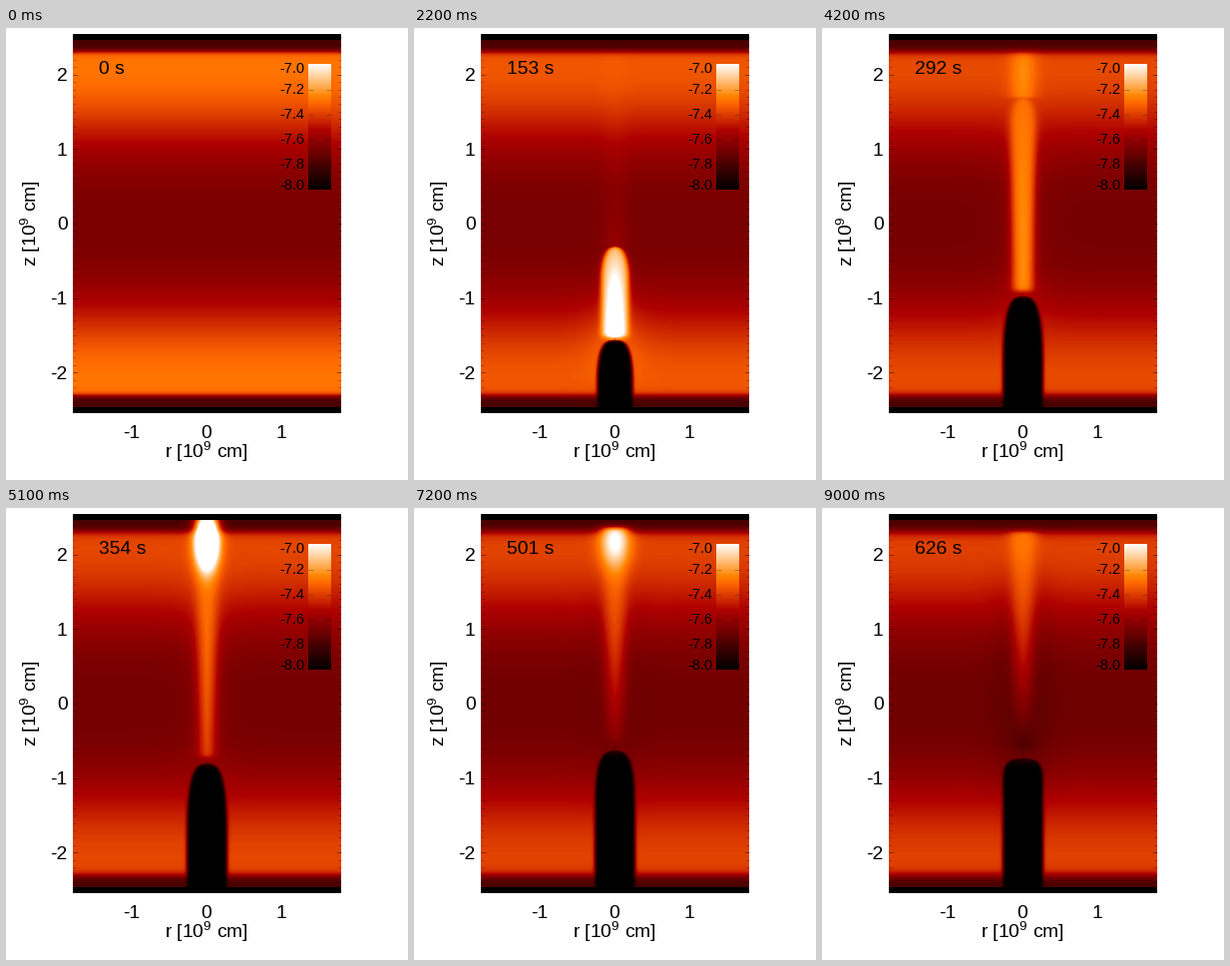
Write a matplotlib script that moves like this. It is 403 px wide and 453 px high and loops after 9.1 s.

```python
import numpy as np
import matplotlib.pyplot as plt
from matplotlib.animation import FuncAnimation
from matplotlib.colors import ListedColormap

W, H, DPI = 403, 453, 64
FRAMES, INTERVAL = 91, 100
X0, X1, Y0, Y1 = 67, 336, 6, 386          # plot box in pixels
CX, CY, UNIT = 201.5, 196, 74.7           # data origin and pixels per unit
PX = 72 / DPI

plt.rcParams["font.family"] = "Liberation Sans"
plt.rcParams["mathtext.default"] = "regular"

# Black - red - orange - white heat scale
i = np.arange(256)
heat_map = ListedColormap(np.clip(
    np.stack([i / 176, (i - 120) / 135, (i - 190) / 65], axis=1), 0, 1))

dx = np.abs(np.arange(X0, X1) + 0.5 - CX)[None, :]
y = (np.arange(Y0, Y1) + 0.5)[:, None]
z = np.abs(y - CY) / UNIT


def edge(d, soft):
    return 0.5 * (1 + np.tanh(d / soft))


def bell(d, width):
    return np.exp(-(d / width) ** 2)


def dome(top, height, power, root):
    s = np.clip((y - top) / height, 0, 1)
    return (1 - (1 - s) ** power) ** root


def layers(n):
    """Horizontal bands: dim middle, bright shells, dark rim."""
    low = .335 - .03 * n / FRAMES
    high = .71 - .11 * (1 - np.exp(-n / 28))
    shell = low + (high - low) * np.sin(np.pi / 2 * z / 2.1) ** 3
    inside = edge(2.31 - z, .04 + .03 * n / FRAMES)
    return .2 + (shell - .2) * inside


def add_jet(u, n, front, tail):
    late = np.clip((n - 34) / 17, 0, 1)
    top = max(front, 12)
    s = np.clip((y - top) / max(tail - top, 1), 0, 1)
    behind = edge(y - front, 1.6)
    rim_cut = edge(y - np.clip(8 + .55 * (n - 51), 8, 24), 3)

    # faint warming ahead of the front, and a halo that turns into cool flanks
    ahead = .0035 * n * np.exp(-np.abs(y - front) / (4 * n)) * (1 - behind)
    u = u + ahead * bell(dx, 13) * edge(y - 24, 4)
    u = u + .002 * (62 - n) * bell(dx, 28) * edge(y - top - 50, 30) \
        * edge(tail + 30 - y, 20)

    # hot column: cools with age, first at its foot
    heat = min(.7 + 12 * np.exp(-n / 5), 1.6)
    core = 1.9 * np.exp(-n / 16) * s * bell(dx, 9)
    heat = heat + core - .01 * max(n - 34, 0) * s ** 2
    half = (14 - 6 * late * np.sqrt(s)) * dome(front, 32, 2, .4)
    column = (edge(half - dx, 3.2 + 3.5 * late) * behind * rim_cut
              * edge(tail - 1 - n / 10 - y, 3) * min(n / 3, 1))
    u = u + (heat - u) * column

    # flash where the jet breaks out, quick rise and slow decay
    flash = bell(n - 51, 4 if n < 51 else 20)
    spread = 11 + .2 * max(n - 51, 0)
    return u + flash * bell(dx, spread) * bell(y - 34, 26) * rim_cut


def add_wake(u, n, tail):
    height = max(80 * np.sin(np.pi * n / 100), 12)
    half = min(15.2 + .11 * n, 20) * dome(tail, height, 3, .35)
    return u * (1 - edge(half - dx, 1.8) * edge(y - tail, 1 + .05 * n))


def field(n):
    u = layers(n)
    if n > 0:
        front = 383 - 7.45 * n
        tail = 386 - 143 * (1 - (1 - n / 73) ** 2)
        u = add_wake(add_jet(u, n, front, tail), n, tail)
    return np.where(z > 2.46, 0, u)


fig = plt.figure(figsize=(W / DPI, H / DPI), dpi=DPI, facecolor="white")
ax = fig.add_axes([0, 0, 1, 1])
ax.axis("off")


def label(x, base, text, size=19.2, ha="center", **kw):
    return ax.text(x, base, text, fontsize=size * PX, ha=ha,
                   va="baseline", color="black", **kw)


def heat_image(data, box):
    return ax.imshow(data, cmap=heat_map, vmin=0, vmax=1, aspect="auto",
                     extent=box, interpolation="nearest")


def side_ticks(points, left, right, length):
    for a, b in ((left, left + length), (right - length, right)):
        ax.hlines(points, a, b, color="black", lw=.6 * PX, alpha=.45)


image = heat_image(field(0), (X0, X1, Y1, Y0))
side_ticks(CY - UNIT * np.arange(-25, 26) / 10, X0, X1, 3)
side_ticks(CY - UNIT * np.arange(-2, 3), X0, X1, 5)

for v in range(-2, 3):
    label(61.5, CY - UNIT * v + 6.5, str(v), ha="right")
for v in (-1, 0, 1):
    label(CX - .7 + UNIT * v, 411.2, str(v))
label(CX - .5, 431, "r [10$^9$ cm]")
label(31, CY, "z [10$^9$ cm]", rotation=90, rotation_mode="anchor")

# Colour bar
heat_image(np.linspace(1, 0, 256)[:, None], (303, 326, 162, 36))
marks = 36.5 + 25 * np.arange(6)
side_ticks(marks[1:-1], 303, 326, 5)
for k, pos in enumerate(marks):
    label(299.5, np.clip(pos, 40.5, 157) + 4.6, f"{-7 - k / 5:.1f}",
          14.5, "right")

clock = label(93, 46, "0 s", ha="left")
ax.set_xlim(0, W)
ax.set_ylim(H, 0)


def update(n):
    image.set_data(field(n))
    clock.set_text(f"{round(6.957 * n - .35)} s")
    return image, clock


anim = FuncAnimation(fig, update, frames=FRAMES, interval=INTERVAL,
                     repeat=True, repeat_delay=0)
plt.show()
```
